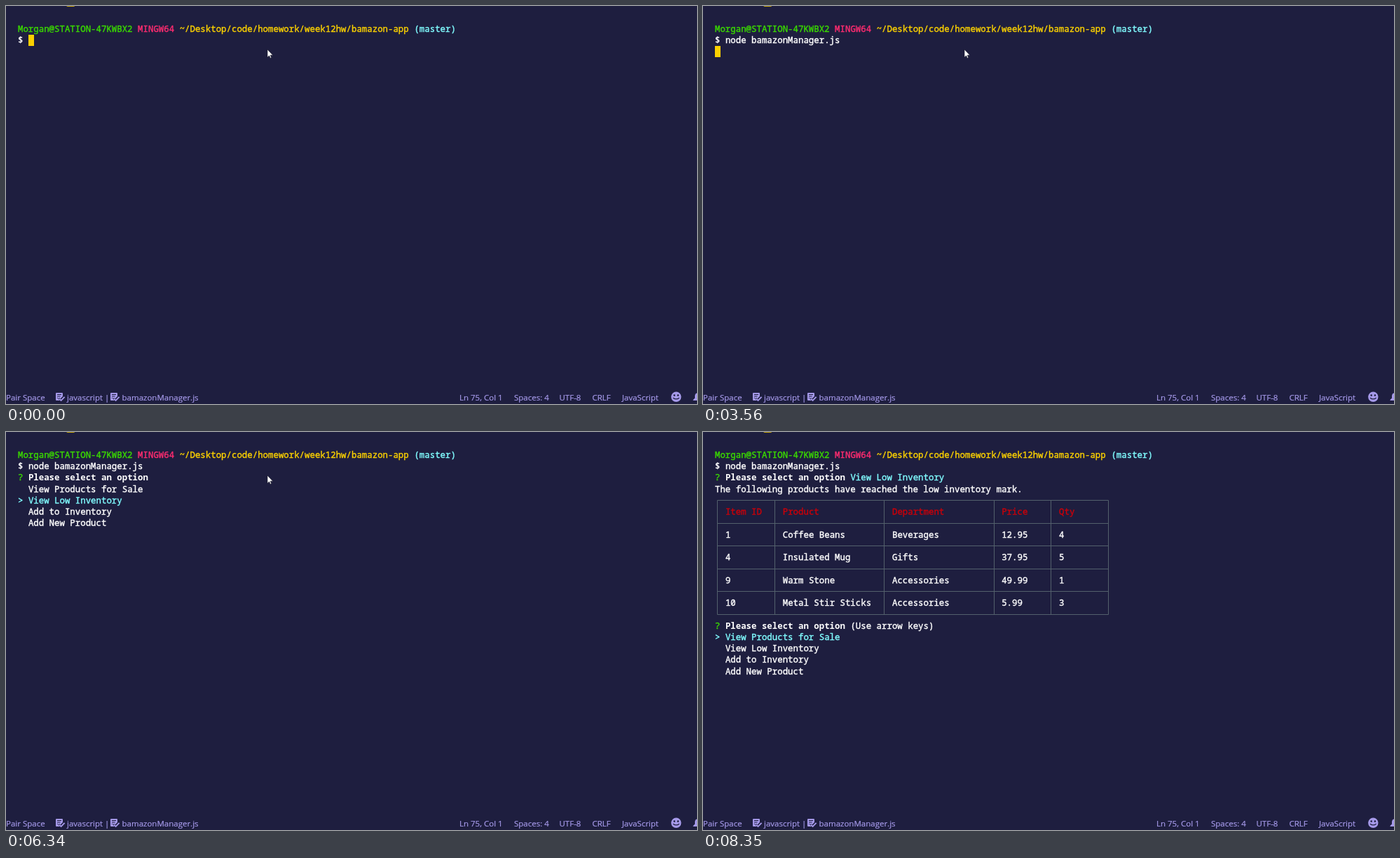
An HTML page that plays this animation: 986 by 568 pixels, repeating every 9290 ms.

```html
<!DOCTYPE html>
<html lang="en">
<head>
<meta charset="utf-8">
<title>Terminal session</title>
<style>
  html, body { margin: 0; width: 100%; height: 100%; overflow: hidden; background: #1e1e3f; }
  svg { display: block; width: 986px; height: 568px; }
  text { white-space: pre; }
  .term { font: 500 12.4px "Noto Sans Mono", "DejaVu Sans Mono", monospace; stroke-width: .4; }
  .term .bold { font-weight: 700; stroke-width: 0; }
  .status { font: 11.5px "Open Sans", "Noto Sans", sans-serif; fill: #a599e9; }
  .status text { stroke: #a599e9; stroke-width: .2; }
</style>
</head>
<body>
<svg viewBox="0 0 986 568">
  <rect width="986" height="568" fill="#1e1e3f"/>
  <rect x="86" y="-4" width="12.5" height="4.8" rx="2" fill="#fad000"/>
  <g class="term" id="prompt"></g>
  <g class="term" id="screen"></g>
  <g class="status" id="status">
    <defs>
      <g id="checklist">
        <path d="M1 0H9Q10 0 10 1V5L6.5 8.5L5 7L3.5 8.5L6 11H1Q0 11 0 10V1Q0 0 1 0Z"/>
        <path d="M2 2.5H8M2 5H6.5M2 7.5H3" stroke="#1e1e3f" fill="none"/>
        <path d="M5 8.6L7.6 11L12.6 5.8" stroke="#a599e9" stroke-width="1.9" fill="none"/>
      </g>
    </defs>
    <use href="#checklist" x="71" y="552"/>
    <use href="#checklist" x="149" y="552"/>
    <circle cx="956.3" cy="557.8" r="7.2"/>
    <g fill="#1e1e3f">
      <circle cx="953.7" cy="555.6" r="1.3"/>
      <circle cx="958.9" cy="555.6" r="1.3"/>
      <path d="M952 559.2Q956.3 562.6 960.6 559.2" fill="none" stroke="#1e1e3f" stroke-width="1.4"/>
    </g>
    <path d="M980.5 563V562L983 559.5V556Q983.4 552.5 987 552V563Z"/>
  </g>
  <path id="mouse" d="M0 0V11.3L2.6 8.9L4.1 12.4L5.7 11.7L4.3 8.2H7.8Z"
        fill="#fff" stroke="#111122" stroke-width=".6"/>
</svg>
<script>
const LOOP = 9290, CELL = 7.44, LINE = 16.25, LEFT = 17, TOP = 24.5;
const green = '#3ad900', pink = '#ff2c70', yellow = '#fad000', cyan = '#80fcff',
      red = '#c8000a', white = '#fff', rule = '#53606c';
const $ = id => document.getElementById(id);

const colX = col => LEFT + col * CELL;
const run = (row, col, text, color = white, cls = '') =>
  `<text x="${colX(col)}" y="${Math.round(TOP + row * LINE + 12.4)}" fill="${color}" stroke="${color}" class="${cls}">${
    text.replace('>', '&gt;')}</text>`;
const block = (row, col) =>
  `<rect x="${Math.round(colX(col))}" y="${Math.round(TOP + row * LINE)}" width="8" height="16" fill="${yellow}"/>`;

const options = ['View Products for Sale', 'View Low Inventory', 'Add to Inventory', 'Add New Product'];
const question = row => run(row, 0, '?', green) + run(row, 2, 'Please select an option', white, 'bold');
const menu = (row, chosen, hint) => question(row) +
  (hint ? run(row, 26, '(Use arrow keys)') : '') +
  options.map((option, i) => {
    const active = i === chosen, y = row + 1 + i;
    return (active ? run(y, 0, '>', cyan) : '') + run(y, 2, option, active ? cyan : white);
  }).join('');

const edges = [0, 11, 32, 53, 64, 75];
const items = [
  ['Item ID', 'Product', 'Department', 'Price', 'Qty'],
  ['1', 'Coffee Beans', 'Beverages', '12.95', '4'],
  ['4', 'Insulated Mug', 'Gifts', '37.95', '5'],
  ['9', 'Warm Stone', 'Accessories', '49.99', '1'],
  ['10', 'Metal Stir Sticks', 'Accessories', '5.99', '3']
];
function table(row) {
  const lineX = edges.map(col => Math.floor(colX(col + .5)) + .5);
  const lineY = i => Math.floor(TOP + (row + 2 * i + .5) * LINE) + .5;
  const across = items.concat([0]).map((_, i) => `M${lineX[0]} ${lineY(i)}H${lineX[5]}`).join('');
  const down = lineX.map(x => `M${x} ${lineY(0)}V${lineY(items.length)}`).join('');
  const cells = items.map((cols, i) => cols.map((text, j) =>
    run(row + 1 + 2 * i, edges[j] + 2, text, i ? white : red)).join('')).join('');
  return `<path d="${across + down}" stroke="${rule}" stroke-width="1" fill="none"/>` + cells;
}

const command = 'node bamazonManager.js';
const typing = text => run(1, 2, text) + block(1, 2 + text.length);
const entered = run(1, 2, command);
const result = entered + question(2) + run(2, 26, options[1], cyan) +
  run(3, 0, 'The following products have reached the low inventory mark.') +
  table(4) + menu(15, 0, true);

const scenes = [
  [0, typing('')],
  [360, typing('n')],
  [445, typing('no')],
  [530, typing('nod')],
  [760, typing('node')],
  [1080, typing('node ')],
  [1370, typing('node b')],
  [1550, typing('node bamazon')],
  [2150, typing('node bamazonm')],
  [2930, typing(command + ' ')],
  [3560, entered + block(2, 0)],
  [4480, entered + menu(2, 0, true)],
  [5570, entered + menu(2, 1)],
  [6030, entered + menu(2, 2)],
  [6340, entered + menu(2, 1)],
  [7190, result]
];

// Pointer stops; it has left the stage after the last one.
const stops = [[373, 62], [364, 48], [360, 34], [370, 26], [394, 31], [423, 43], [450, 59], [474, 75]];
const MOVE_START = 7810, MOVE_END = 8350;

$('prompt').innerHTML = run(0, 0, 'Morgan@STATION-47KWBX2', green) + run(0, 23, 'MINGW64', pink) +
  run(0, 31, '~/Desktop/code/homework/week12hw/bamazon-app', yellow) +
  run(0, 76, '(master)', cyan) + run(1, 0, '$', white, 'bold');

$('status').insertAdjacentHTML('beforeend', [
  [0, 'Pair Space'], [87, 'javascript |'], [165.5, 'bamazonManager.js'], [647, 'Ln 75, Col 1'],
  [725, 'Spaces: 4'], [789.5, 'UTF-8'], [836.5, 'CRLF'], [879, 'JavaScript']
].map(([x, text]) => `<text x="${x}" y="562.5">${text}</text>`).join(''));

let shown = -1;
function draw(now) {
  const t = now % LOOP;
  const scene = scenes.filter(([start]) => start <= t).length - 1;
  if (scene !== shown) $('screen').innerHTML = scenes[shown = scene][1];

  const step = t < MOVE_START ? 0
    : 1 + Math.floor((t - MOVE_START) / (MOVE_END - MOVE_START) * 7);
  const stop = stops[step];
  $('mouse').style.display = stop ? '' : 'none';
  if (stop) $('mouse').setAttribute('transform', `translate(${stop})`);
}

const begin = performance.now();
function tick() {
  draw(performance.now() - begin);
  requestAnimationFrame(tick);
}
tick();
</script>
</body>
</html>
```
